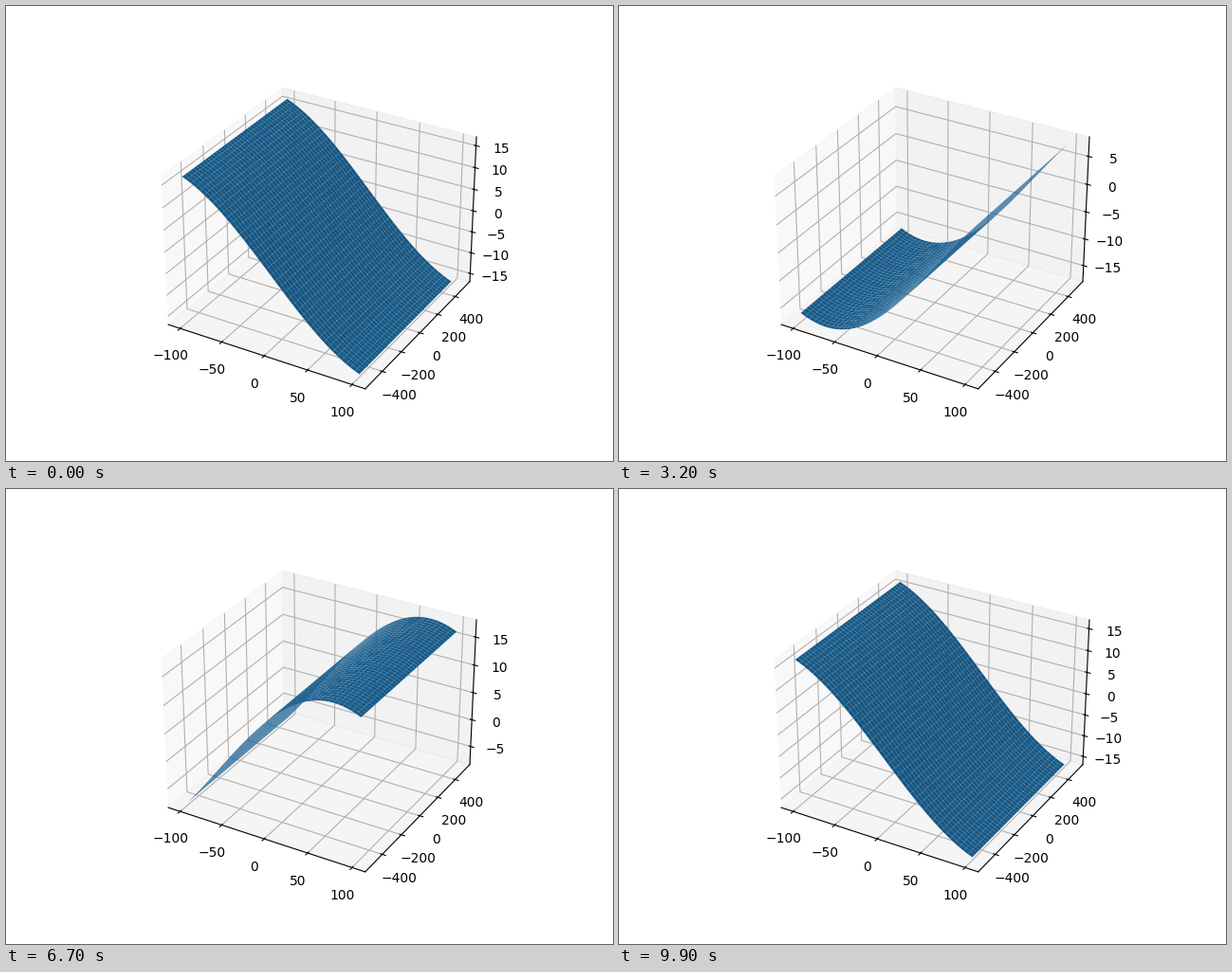
Animation, 640 px wide and 480 px high, one loop 10000 ms. Source, as a matplotlib script:

```python
import numpy as np
import matplotlib.pyplot as plt
from matplotlib.animation import FuncAnimation

FRAMES = 100
CYCLES = 5
AMPLITUDE = 17.5
WAVENUMBER = 0.01199

fig = plt.figure(figsize=(6.4, 4.8), dpi=100)
ax = fig.add_subplot(projection="3d")
x, y = np.meshgrid(np.linspace(-100, 100, 41), np.linspace(-500, 500, 41))


def draw(frame):
    phase = 2 * np.pi * CYCLES * frame / (FRAMES - 1)
    ax.clear()
    ax.plot_surface(x, y, AMPLITUDE * np.sin(phase - WAVENUMBER * x))


anim = FuncAnimation(fig, draw, frames=FRAMES, init_func=lambda: None,
                     interval=100, repeat=True, repeat_delay=0)
plt.show()
```
